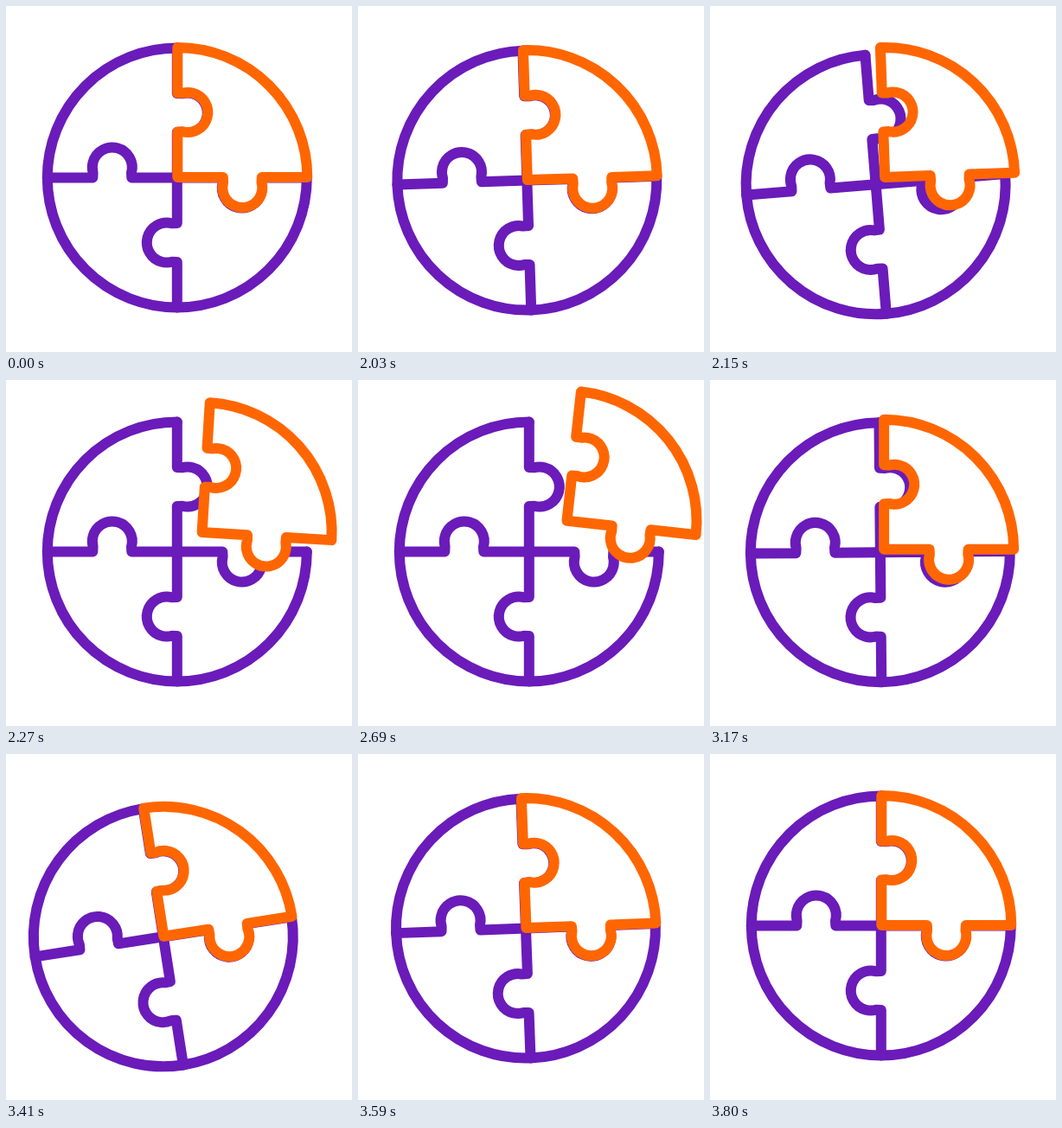
Animation, 400 px wide and 400 px high, one loop 3830 ms. Source, as an HTML page with a canvas:

```html
<!DOCTYPE html>
<html lang="en">
<head>
<meta charset="utf-8">
<title>Puzzle circle</title>
<style>
  html, body { margin: 0; width: 100%; height: 100%; overflow: hidden; background: #fff; }
  canvas { display: block; }
</style>
</head>
<body>
<canvas id="stage" width="400" height="400"></canvas>
<script>
const ctx = document.getElementById('stage').getContext('2d');
const LOOP = 3830, HOLD = 2000, STEP = 30;
const R = 150, PURPLE = '#6a1bb9', ORANGE = '#ff6600';
const DEG = Math.PI / 180;

// Poses are [dx, dy, degrees].
const REST = [0, 0, 0];
const WIND = [-9.5, 12, -7.2];
const OUT = [44, -36, 6.4];
const PUSH = [-17, 13.6, -9.4];

const span = (n, a, b) => Math.min(1, Math.max(0, (n - a) / (b - a)));
const smooth = x => x * x * (3 - 2 * x);
const mix = (a, b, k) => a.map((v, i) => v + (b[i] - v) * k);
const scale = (a, k) => a.map(v => v * k);
const add = (a, b) => a.map((v, i) => v + b[i]);

// Ease curve with control points (x1, 0) and (x2, 1).
function ease(x, x1, x2) {
  let lo = 0, hi = 1;
  for (let i = 0; i < 30; i++) {
    const s = (lo + hi) / 2, q = 1 - s;
    const at = 3 * x1 * s * q * q + 3 * x2 * s * s * q + s * s * s;
    if (at < x) lo = s; else hi = s;
  }
  return smooth(lo);
}

function shove(n) {
  if (n < 45) return scale(PUSH, smooth(span(n, 38, 45)));
  return scale(PUSH, 1 - ease(span(n, 45, 60), 0.35, 0.3));
}

function basePose(n) {
  if (n <= 3) return mix(REST, WIND, smooth(span(n, 0, 3)));
  if (n <= 8) return mix(WIND, REST, smooth(span(n, 3, 8)));
  return shove(n);
}

function piecePose(n) {
  if (n <= 3) return basePose(n);
  if (n <= 18) {
    const k = ease(span(n, 3, 18), 0.1, 0.25);
    const pose = mix(WIND, OUT, k);
    pose[2] = mix(WIND, OUT, Math.pow(k, 0.7))[2];
    return pose;
  }
  const back = 1 - Math.pow(span(n, 18, 39.7), 2.715);
  return add(scale(OUT, back), shove(n));
}

// One spoke with its round tab, drawn from the hub or toward it.
function spoke(turn, inward) {
  const a = 195 * DEG, b = -15 * DEG;
  ctx.save();
  ctx.rotate(turn * 90 * DEG);
  ctx.lineTo(inward ? R : 0, 0);
  ctx.lineTo(inward ? 97.5 : 52.5, 0);
  ctx.arc(75, 12, 23, inward ? b : a, inward ? a : b, !inward);
  ctx.lineTo(inward ? 52.5 : 97.5, 0);
  ctx.lineTo(inward ? 0 : R, 0);
  ctx.restore();
}

function place([dx, dy, deg], x, y, color, paint) {
  ctx.save();
  ctx.translate(x + dx, y + dy);
  ctx.rotate(deg * DEG);
  ctx.strokeStyle = color;
  paint();
  ctx.restore();
}

function base() {
  for (let i = 0; i < 4; i++) {
    ctx.beginPath();
    spoke(i, false);
    ctx.stroke();
  }
  ctx.beginPath();
  ctx.arc(0, 0, R, 0, 270 * DEG);
  ctx.stroke();
}

function piece() {
  ctx.beginPath();
  spoke(-1, false);
  ctx.arc(0, 0, R, -90 * DEG, 0);
  spoke(0, true);
  ctx.closePath();
  ctx.fill();
  ctx.stroke();
}

function draw(ms) {
  const n = Math.max(0, Math.floor((ms % LOOP - HOLD) / STEP));
  ctx.fillStyle = '#fff';
  ctx.fillRect(0, 0, 400, 400);
  ctx.lineWidth = 12;
  ctx.lineCap = ctx.lineJoin = 'round';
  place(basePose(n), 197.8, 198.5, PURPLE, base);
  place(piecePose(n), 198.3, 198, ORANGE, piece);
}

const start = performance.now();
function tick() {
  draw(performance.now() - start);
  requestAnimationFrame(tick);
}
tick();
</script>
</body>
</html>
```
